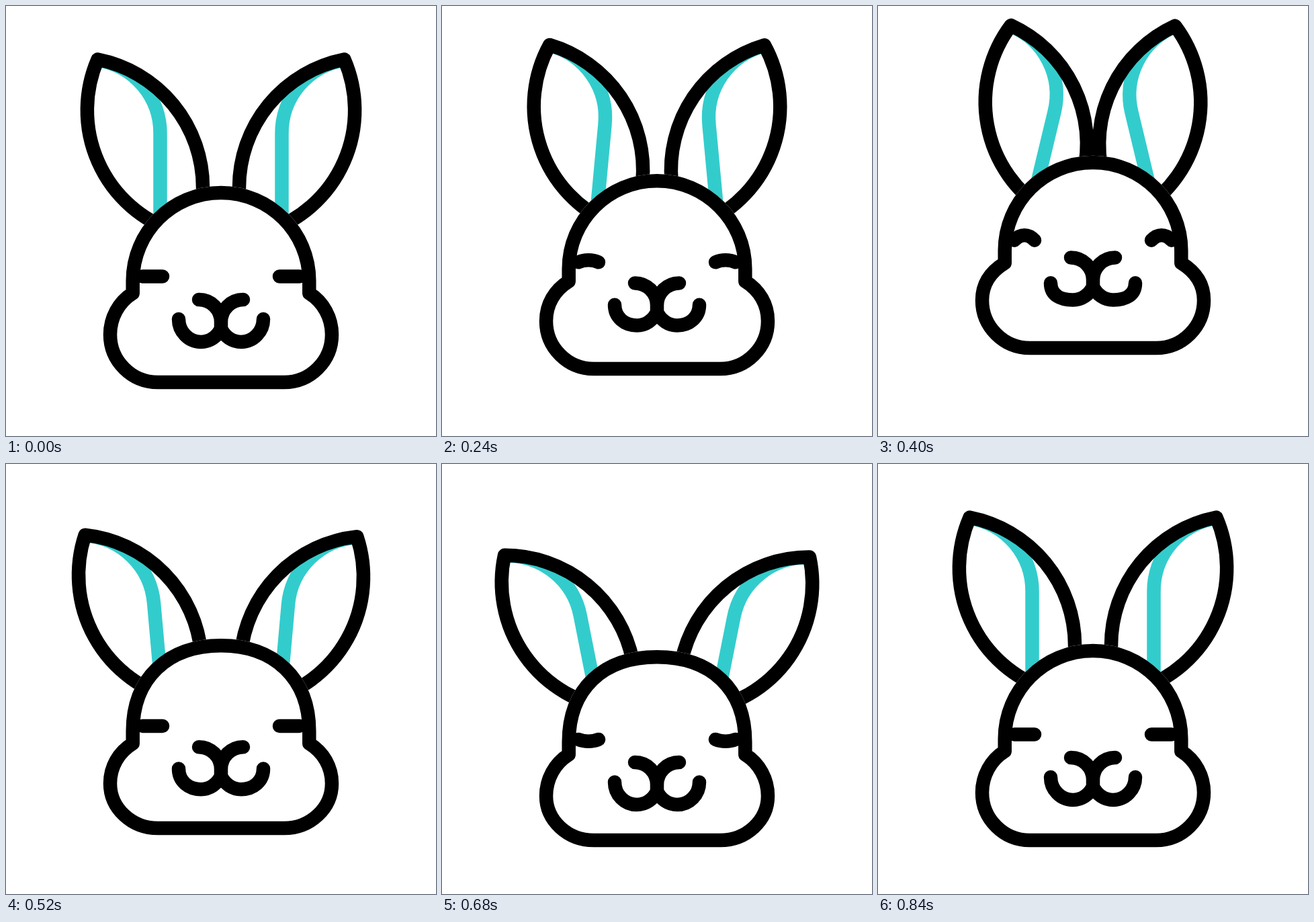
An HTML page with a canvas that plays this animation: 640x640 px, repeating every 1480 ms.

```html
<!DOCTYPE html>
<html lang="en">
<head>
<meta charset="utf-8">
<title>Hopping rabbit</title>
<style>
html, body { margin: 0; height: 100%; overflow: hidden; background: #fff; }
canvas { display: block; width: 640px; height: 640px; }
</style>
</head>
<body>
<canvas id="stage" width="640" height="640"></canvas>
<script>
const LOOP = 1480, STEP = 40;
const TEAL = '#33cccc';
const MIRROR = new DOMMatrix([-1, 0, 0, 1, 640, 0]);
const ctx = document.getElementById('stage').getContext('2d');
ctx.lineWidth = 20.5;
ctx.lineCap = ctx.lineJoin = 'round';

const earOutline = new Path2D('M293 290V270A194.2 194.2 0 0 0 136.5 79.5A190 190 0 0 0 250 335');
const earFold = new Path2D('M136.5 80.5A110 110 0 0 1 229.5 190V330');
const pivot = { x: 240.5, y: 317 };

const ease = u => u * u * (3 - 2 * u);

// Rest until 120 ms, top of the hop at 400, landing squash at 600, rest from 840.
function between(t, top, squash) {
  if (t <= 120 || t >= 840) return 0;
  if (t < 400) return top * ease((t - 120) / 280);
  if (t < 600) return top + (squash - top) * ease((t - 400) / 200);
  return squash * (1 - ease((t - 600) / 240));
}

function stroke(path, color) {
  ctx.strokeStyle = color;
  ctx.stroke(path);
}

// Joins a left half with its mirror image.
function whole(data) {
  const half = new Path2D(data), path = new Path2D(half);
  path.addPath(half, MIRROR);
  return path;
}

function headPath(t) {
  const top = 278 + between(t, -45, 12.5);
  const side = 409 + between(t, -45, 6.75);
  const cheek = 489 + between(t, -51, 6.75);
  const base = 560 + between(t, -51, 0);
  const notch = side + 18.5;
  const dome = 72.4 + between(t, 0, 10), jowl = (base - cheek) * 0.5523;
  return whole(`M320 ${top}
    C${320 - dome} ${top} 188.7 ${side - dome} 188.7 ${side} V${notch}
    C167.5 ${notch + 13} 155 ${cheek - 24.7} 155 ${cheek}
    C155 ${cheek + jowl} 186.8 ${base} 226 ${base} H320`);
}

function facePath(t) {
  const soft = between(t, -53.8, 10);
  const nose = between(t, -62.5, 9.5);
  const eye = 402.5 + soft, bend = eye + between(t, -10, 5.3);
  const corner = 466 + soft, lip = 500 + nose, stem = 470 + nose;
  return whole(`M203 ${eye}C212 ${bend} 224 ${bend} 233 ${eye}
    M287 ${437 + nose}C305.2 ${437 + nose} 320 ${stem - 18.2} 320 ${stem}
    V${stem + 10}
    C314.6 ${lip - 8} 303.1 ${lip} 290 ${lip}
    C271.8 ${lip} 257 ${corner + 18.6} 257 ${corner}`);
}

function drawEar(t, right) {
  const lift = right ? between(t, -32.2, 46) : between(t, -32.9, 42.5);
  ctx.save();
  if (right) ctx.transform(-1, 0, 0, 1, 640, 0);
  ctx.translate(pivot.x + between(t, 3, 1.2), pivot.y + lift);
  ctx.rotate(between(t, 13.5, -15.2) * Math.PI / 180);
  ctx.translate(-pivot.x, -pivot.y);
  stroke(earFold, TEAL);
  stroke(earOutline, '#000');
  ctx.restore();
}

function draw(t) {
  ctx.fillStyle = '#fff';
  ctx.fillRect(0, 0, 640, 640);
  drawEar(t, false);
  drawEar(t, true);

  const head = headPath(t);
  ctx.fill(head);
  stroke(head, '#fff');
  stroke(head, '#000');
  stroke(facePath(t), '#000');
}

const start = performance.now();
function tick() {
  const t = (performance.now() - start) % LOOP;
  draw(Math.floor(t / STEP) * STEP);
  requestAnimationFrame(tick);
}
tick();
</script>
</body>
</html>
```
